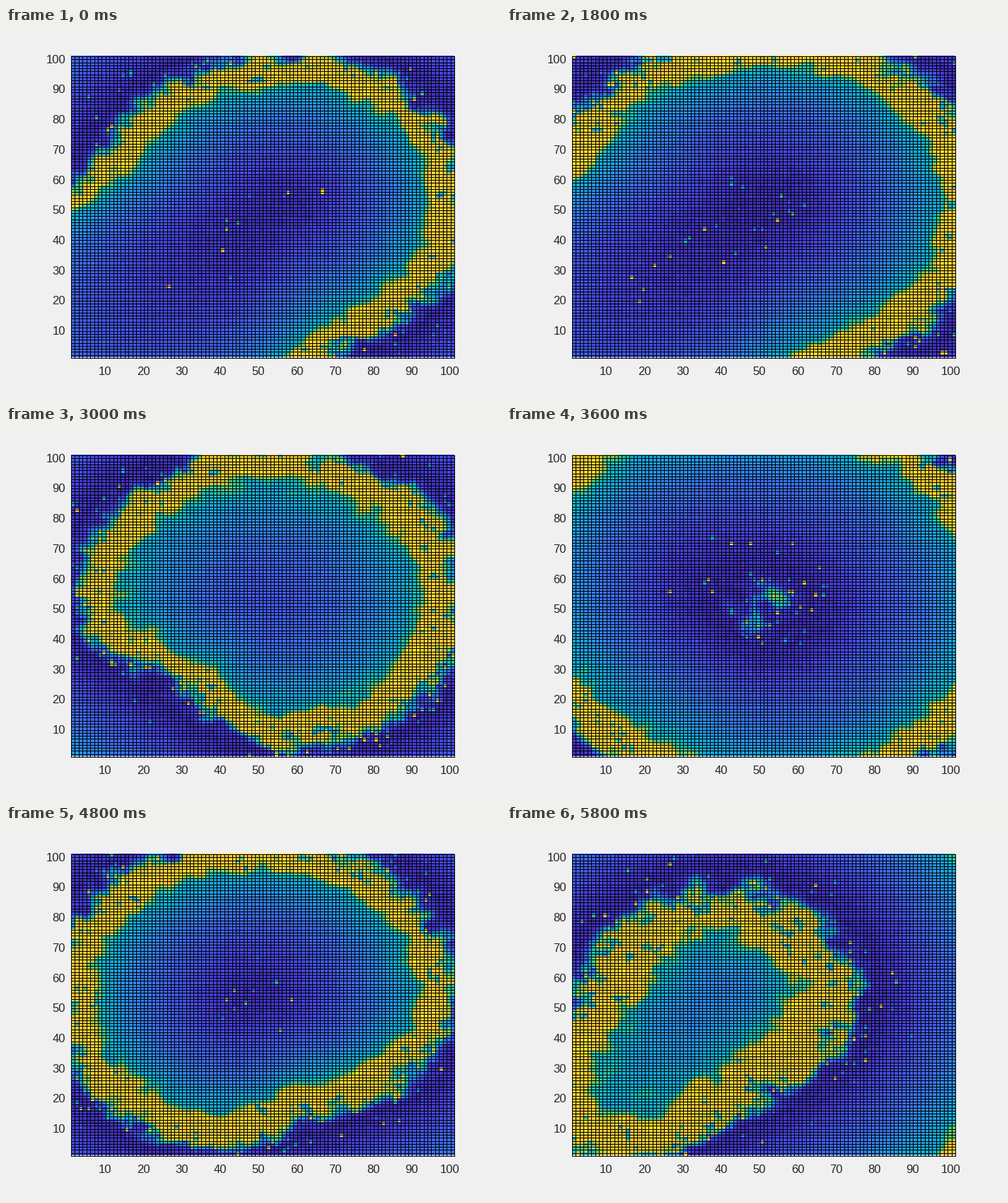
Animation, 700 px wide and 525 px high, one loop 6 s. Source, as a matplotlib script:

```python
import numpy as np
import matplotlib.pyplot as plt
from collections import namedtuple
from matplotlib.animation import FuncAnimation
from matplotlib.collections import LineCollection
from matplotlib.colors import LinearSegmentedColormap

W, H, DPI = 700, 525, 100
FRAMES, INTERVAL = 30, 200
LEFT, RIGHT, TOP, BOTTOM = 91.5, 633.5, 39.5, 466.5
N = 100
CYCLE = 55   # phase length of one wave, in cells
BAND = 10    # phase length of the bright band

PARULA = LinearSegmentedColormap.from_list("parula", [
    (.2422, .1504, .6603), (.2803, .2782, .9221), (.2440, .4358, .9988),
    (.1540, .5902, .9218), (.0297, .7082, .8163), (.2161, .7843, .5923),
    (.6720, .7793, .2227), (.9970, .7659, .2199), (.9769, .9839, .0805)], N=256)

# A ring is a circle with one lobe (or dent) towards an angle.
Ring = namedtuple("Ring", "step x y r lobe angle width depth")
RINGS = [
    Ring(0, 56, 52, 48, 90, 225, 8, 37),
    Ring(5, 53, 29, 78, 60, 270, 11, 40),
    Ring(9, 52, 52, 57, 90, 222, 10, 39),
    Ring(15, 53, 53, 50, -12, 230, 9, 25),
    Ring(20, 49, 50, 43, 10, 140, 14, 21),
    Ring(24, 49, 54, 52, -10, 295, 9, 37),
    Ring(29, 40, 55, 35, 32, 232, 16, 13),
]

cells = np.arange(N) + 1.5
X, Y = np.meshgrid(cells, cells)


def phase(ring):
    dx, dy = X - ring.x, Y - ring.y
    rho = np.hypot(dx, dy)
    toward = np.cos(np.arctan2(dy, dx) - np.radians(ring.angle))
    outer = ring.r + ring.lobe * ((1 + toward) / 2) ** 12
    inner = outer - ring.width
    core = BAND + ring.depth * (1 - (rho / inner) ** 1.5)
    band = (outer - rho) * BAND / ring.width
    wake = (outer - rho) * 1.05
    return np.where(rho < inner, core, np.where(rho < outer, band, wake))


PHASES = [phase(ring) for ring in RINGS]
STEPS = [ring.step for ring in RINGS]


def smooth_noise(rng, passes):
    n = rng.standard_normal((N, N))
    for _ in range(passes):
        for axis in (0, 1):
            n = (np.roll(n, 1, axis) + n + np.roll(n, -1, axis)) / 3
    return n / n.std()


def level(s):
    """Colour level along one wave: bright band, slow fade, ragged tail."""
    return np.interp(s, [0, 2, 7, 9, 10.5, 12, 14, 20, 28, 36, 44, 49, 52, 55],
                     [.64, .84, .87, .92, .8, .6, .48, .37, .26, .17, .08, .04, .12, .64])


def field(step):
    rng = np.random.default_rng(100 + step)
    k = min(np.searchsorted(STEPS, step, side="right") - 1, len(STEPS) - 2)
    f = (step - STEPS[k]) / (STEPS[k + 1] - STEPS[k])
    # each pose lies one full cycle after the one before it
    s = (1 - f) * PHASES[k] + f * (PHASES[k + 1] - CYCLE)

    # rough near the band, calm elsewhere
    rough = np.interp(s % CYCLE, [0, 10, 20, 40, 47, 55], [1, .7, .25, 0, .2, 1])
    wobble = 1.8 * smooth_noise(rng, 7) + 1.1 * smooth_noise(rng, 1)
    s = (s + rough * wobble) % CYCLE
    v = level(s) + .014 * rng.standard_normal((N, N))

    bright = s < BAND
    v += bright * rng.uniform(-.06, .06, (N, N))
    # dark holes, denser towards the tail of the band
    holes = bright & (smooth_noise(rng, 1) > .9 + .11 * s)
    v = np.where(holes, rng.uniform(.4, .72, (N, N)), v)

    # sparks left behind the tail
    cluster = np.clip(smooth_noise(rng, 4), 0, 2)
    chance = .24 * np.exp((s - CYCLE) / 2.5) + .024 * cluster * (s > 41)
    sparks = rng.random((N, N)) < chance
    v = np.where(sparks, rng.uniform(.15, .95, (N, N)), v)
    return np.clip(v, 0, 1)


def px(u):
    return LEFT + (u - 1) * (RIGHT - LEFT) / N


def py(u):
    return BOTTOM - (u - 1) * (BOTTOM - TOP) / N


fig = plt.figure(figsize=(W / DPI, H / DPI), dpi=DPI, facecolor="#f0f0f0")
ax = fig.add_axes([0, 0, 1, 1])
image = ax.imshow(field(0), cmap=PARULA, vmin=0, vmax=1, origin="lower",
                  extent=(LEFT, RIGHT, BOTTOM, TOP), interpolation="nearest",
                  aspect="auto")
ax.set(xlim=(0, W), ylim=(H, 0))
ax.axis("off")

edges = np.arange(1, N + 2)
xs, ys = np.floor(px(edges)) + .5, np.floor(py(edges)) + .5
lines = [[(x, TOP), (x, BOTTOM)] for x in xs] + [[(LEFT, y), (RIGHT, y)] for y in ys]
ax.add_collection(LineCollection(lines, colors="black", linewidths=72 / DPI,
                                 antialiaseds=False, capstyle="projecting"))

font = dict(family="Liberation Sans", size=16.67 * 72 / DPI, color="#262626",
            va="baseline")
for u in range(10, 101, 10):
    ax.text(px(u), 491, str(u), ha="center", **font)
    ax.text(84, py(u) + 6, str(u), ha="right", **font)


def update(step):
    image.set_data(field(step))
    return [image]


anim = FuncAnimation(fig, update, frames=FRAMES, interval=INTERVAL,
                     repeat=True, repeat_delay=0, blit=False)
plt.show()
```
